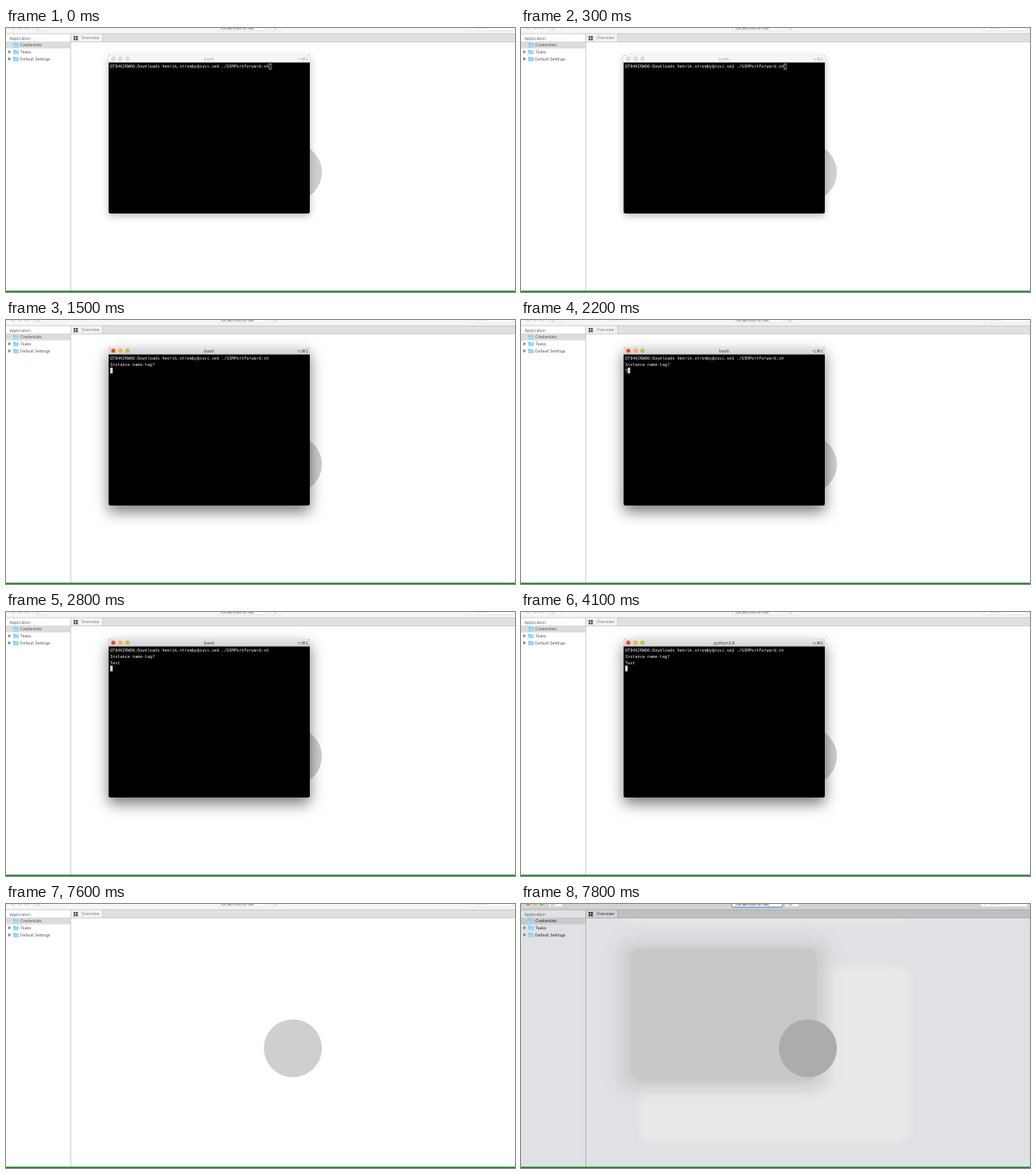
These frames come from a looping animation (640 px wide and 333 px high, 8000 ms). An HTML page:

```html
<!DOCTYPE html>
<html lang="en">
<head>
<meta charset="utf-8">
<title>Port forward session</title>
<style>
html, body { margin: 0; width: 100%; height: 100%; overflow: hidden; background: #fff; }
svg { display: block; width: 640px; height: 333px; }
text { font: 5px Inter, sans-serif; text-rendering: geometricPrecision; white-space: pre; }
.title { font-size: 5.6px; text-anchor: middle; }
.keys { font: 5.2px "DejaVu Sans", sans-serif; text-anchor: end; }
.url { font-size: 6px; }
.shell text { font: 5.18px "DejaVu Sans Mono", monospace; fill: #f4f4f4; }
.side { fill: #565b60; }
.tri { fill: #7c7c7c; }
.idle-shadow { filter: drop-shadow(0 3px 5px rgba(0,0,0,.28)); }
.live-shadow { filter: drop-shadow(0 8px 9px rgba(0,0,0,.52)); }
.soft { filter: blur(4px); }
.halo { filter: blur(9px); }
.core { filter: blur(1.2px); }

/* one 8 s clock, hard cuts only */
.k { animation: 8s step-end infinite; }
.term { animation-name: term; }
.idle { animation-name: idle; }
.live { animation-name: live; }
.ask { animation-name: ask; }
.c1 { animation-name: c1; }
.c2 { animation-name: c2; }
.c3 { animation-name: c3; }
.c4 { animation-name: c4; }
.bash { animation-name: bash; }
.python { animation-name: python; }
.started { animation-name: started; }
.cursor { animation-name: cursor; }
.back { animation-name: back; }
.front { animation-name: front; }
@keyframes term { 0% { opacity: 1 } 95%, to { opacity: 0 } }
@keyframes idle { 0% { opacity: 1 } 10%, to { opacity: 0 } }
@keyframes live { 0% { opacity: 0 } 10%, to { opacity: 1 } }
@keyframes ask { 0% { opacity: 0 } 18.75%, to { opacity: 1 } }
@keyframes c1 { 0% { opacity: 0 } 27.5%, to { opacity: 1 } }
@keyframes c2 { 0% { opacity: 0 } 30%, to { opacity: 1 } }
@keyframes c3 { 0% { opacity: 0 } 32.5%, to { opacity: 1 } }
@keyframes c4 { 0% { opacity: 0 } 33.75%, to { opacity: 1 } }
@keyframes bash { 0% { opacity: 1 } 45%, to { opacity: 0 } }
@keyframes python { 0% { opacity: 0 } 45% { opacity: 1 } 85%, to { opacity: 0 } }
@keyframes started { 0% { opacity: 0 } 85%, to { opacity: 1 } }
@keyframes back { 0% { opacity: 1 } 97.5%, to { opacity: 0 } }
@keyframes front { 0% { opacity: 0 } 97.5%, to { opacity: 1 } }
@keyframes cursor {
  0% { transform: translate(199.6px, 0) }
  18.75% { transform: translate(0, 15.1px) }
  27.5% { transform: translate(3.12px, 15.1px) }
  30% { transform: translate(6.24px, 15.1px) }
  32.5% { transform: translate(9.36px, 15.1px) }
  33.75% { transform: translate(12.48px, 15.1px) }
  35% { transform: translate(0, 22.6px) }
  85%, to { transform: translate(0, 37.7px) }
}
</style>
</head>
<body>
<svg viewBox="0 0 640 333" xmlns="http://www.w3.org/2000/svg">
  <defs>
    <linearGradient id="bar" x2="0" y2="1">
      <stop stop-color="#e6e6e6"/><stop offset="1" stop-color="#d2d2d2"/>
    </linearGradient>
    <clipPath id="pane"><rect x="82" y="18" width="558" height="314"/></clipPath>
    <g id="folder">
      <path d="M9 -2.6h2.6l.8 .9h3.6v4.6h-7z" fill="#7cc9ee"/>
      <path d="M9 -.8h7v3.7h-7z" fill="#9bdaf6"/>
    </g>
    <g id="grid">
      <path d="M85 10h2.4v2.4h-2.4zM88 10h2.4v2.4h-2.4zM85 13h2.4v2.4h-2.4zM88 13h2.4v2.4h-2.4z"/>
    </g>
    <path id="titlebar" d="M129 43.6V36.5a2.5 2.5 0 0 1 2.5 -2.5H379.500a2.500 2.500 0 0 1 2.500 2.500V43.600z"/>
  </defs>

  <!-- app window, inactive -->
  <g class="k back">
    <rect width="640" height="333" fill="#fff"/>
    <rect width="640" height="7" fill="#f6f6f6"/>
    <g fill="#e2e2e2" stroke="#d2d2d2" stroke-width=".5">
      <circle cx="9" cy="-1" r="2.6"/><circle cx="17.500" cy="-1" r="2.6"/><circle cx="26" cy="-1" r="2.6"/>
    </g>
    <g fill="#fafafa" stroke="#dedede" stroke-width=".6">
      <rect x="35" y="-8" width="17" height="11.500" rx="1.5"/>
      <rect x="265" y="-8" width="64" height="11.500" rx="1.5"/>
      <rect x="332" y="-8" width="17" height="11.500" rx="1.5"/>
      <rect x="578" y="-8" width="59" height="11.500" rx="1.5"/>
    </g>
    <text class="url" x="270" y="1.500" fill="#666">localhost:8788</text>
    <text x="589" y="1.300" font-size="5.4" fill="#c4c4c4">Search</text>
    <g fill="none" stroke="#aaa" stroke-width=".6">
      <circle cx="40" cy="-.5" r="2.300"/><circle cx="338.500" cy="-.5" r="2.300"/>
      <path d="M583 0l1.500 1.500" stroke="#ccc"/>
    </g>
    <rect y="17" width="81" height="8.700" fill="#dcdcdc"/>
    <rect x="82" y="7" width="558" height="10.500" fill="#e0e0e0"/>
    <rect x="82" y="7" width="39" height="10.500" fill="#f4f4f4"/>
    <path d="M0 7.200H640M82 17.500H640M121.500 7V17.500M81.500 7V332" stroke="#c3c3c3" stroke-width=".8"/>
    <use href="#grid" fill="#555"/>
    <text x="95" y="14.200" fill="#737373">Overview</text>
    <circle cx="360.700" cy="182" r="36.500" fill="#cfcfcf"/>
  </g>

  <!-- app window, active -->
  <g class="k front">
    <rect width="640" height="333" fill="#dfe1e4"/>
    <g clip-path="url(#pane)">
      <rect x="135" y="16" width="350" height="7" fill="#e9e9e9" class="soft"/>
      <rect x="150" y="80" width="338" height="220" rx="14" fill="#e9e9e9" class="soft"/>
      <rect x="124" y="46" width="262" height="189" rx="16" fill="#cdced0" class="halo"/>
      <rect x="138" y="56" width="234" height="168" rx="14" fill="#c8c8c8" class="core"/>
    </g>
    <rect width="640" height="7" fill="#d3d3d3"/>
    <circle cx="9" cy="-1" r="2.700" fill="#ee5a4f"/>
    <circle cx="17.500" cy="-1" r="2.700" fill="#f2b552"/>
    <circle cx="26" cy="-1" r="2.700" fill="#62bd55"/>
    <g fill="#fbfbfb" stroke="#bdbdbd" stroke-width=".5">
      <rect x="35" y="-8" width="17" height="11.500" rx="1.5"/>
      <rect x="332" y="-8" width="17" height="11.500" rx="1.5"/>
      <rect x="578" y="-8" width="59" height="11.500" rx="1.5"/>
    </g>
    <rect x="265" y="-8" width="64" height="12" rx="1.800" fill="#fff" stroke="#6d9fd8" stroke-width="1.300"/>
    <text class="url" x="270" y="1.500" fill="#222">localhost:8788</text>
    <text x="589" y="1.300" font-size="5.4" fill="#b0b0b0">Search</text>
    <g fill="none" stroke="#666" stroke-width=".6">
      <circle cx="40" cy="-.5" r="2.300"/><circle cx="338.500" cy="-.5" r="2.300"/>
      <path d="M583 0l1.500 1.500" stroke="#999"/>
    </g>
    <rect y="17" width="81" height="8.700" fill="#c9cacb"/>
    <rect x="82" y="7" width="558" height="10.500" fill="#bfbfbf"/>
    <rect x="82" y="7" width="39" height="10.500" fill="#d3d3d3"/>
    <path d="M0 7.200H640M82 17.500H640M121.500 7V17.500M81.500 7V332" stroke="#a9a9a9" stroke-width=".8"/>
    <use href="#grid" fill="#333"/>
    <text x="95" y="14.200" fill="#222">Overview</text>
    <circle cx="360.700" cy="182" r="36.500" fill="#acacac"/>
  </g>

  <!-- sidebar labels -->
  <text class="side" x="4.500" y="14.700" font-size="5.100">Application</text>
  <use href="#folder" y="21.300"/>
  <use href="#folder" y="30.100"/>
  <use href="#folder" y="39"/>
  <path class="tri" d="M3 27.900l3.400 2.200l-3.400 2.200zM3 36.800l3.400 2.200l-3.400 2.200z"/>
  <g class="k back" fill="#4c4c4c">
    <text x="18" y="23.100">Credentials</text>
    <text x="18" y="31.900">Tasks</text>
    <text x="18" y="40.800">Default Settings</text>
  </g>
  <g class="k front" fill="#1c1c1c">
    <text x="18" y="23.100">Credentials</text>
    <text x="18" y="31.900">Tasks</text>
    <text x="18" y="40.800">Default Settings</text>
  </g>

  <!-- terminal -->
  <g class="k term">
    <g class="k idle">
      <rect class="idle-shadow" x="129" y="34" width="253" height="200" rx="2.500"/>
      <use href="#titlebar" fill="#f6f6f6"/>
      <g fill="#dedede" stroke="#c9c9c9" stroke-width=".5">
        <circle cx="135" cy="38.800" r="2.500"/><circle cx="144" cy="38.800" r="2.500"/><circle cx="152.700" cy="38.800" r="2.500"/>
      </g>
      <text class="title" x="255.500" y="40.800" fill="#a6a6a6">bash</text>
      <text class="keys" x="380.300" y="40.700" fill="#a6a6a6">⌥⌘1</text>
    </g>
    <g class="k live">
      <rect class="live-shadow" x="129" y="34" width="253" height="200" rx="2.500"/>
      <use href="#titlebar" fill="url(#bar)"/>
      <circle cx="135" cy="38.800" r="2.700" fill="#ee5a4f"/>
      <circle cx="135" cy="38.800" r=".9" fill="#8c1f19"/>
      <circle cx="144" cy="38.800" r="2.700" fill="#f5b05a"/>
      <circle cx="152.700" cy="38.800" r="2.700" fill="#c9bd4f"/>
      <g fill="#444">
        <text class="title k bash" x="255.500" y="40.800">bash</text>
        <text class="title k python" x="255.500" y="40.800">python3.8</text>
        <text class="title k started" x="255.200" y="40.800">session-manager-</text>
        <text class="keys" x="380.300" y="40.700">⌥⌘1</text>
      </g>
    </g>
    <g class="shell">
      <text x="131" y="50.400">QT84K2RWD6:Downloads henrik.stromby@zuvi.se$ ./SSMPortForward.sh</text>
      <text class="k ask" x="131" y="57.900">Instance name-tag?</text>
      <text class="k c1" x="131" y="65.500">T</text>
      <text class="k c2" x="134.120" y="65.500">e</text>
      <text class="k c3" x="137.240" y="65.500">s</text>
      <text class="k c4" x="140.360" y="65.500">t</text>
      <text class="k started" x="131" y="80.600">Starting session with SessionId: session-manager-port-forward-035ab377d6444e5e4</text>
      <g class="k cursor">
        <rect class="k idle" x="131.200" y="45.200" width="2.700" height="6.900" fill="none" stroke="#d4d4d4" stroke-width=".7"/>
        <rect class="k live" x="131" y="45" width="3.200" height="7.300" fill="#d4d4d4"/>
      </g>
    </g>
  </g>

  <rect y="331.400" width="640" height="1.600" fill="#1c7d1f"/>
</svg>
</body>
</html>
```
